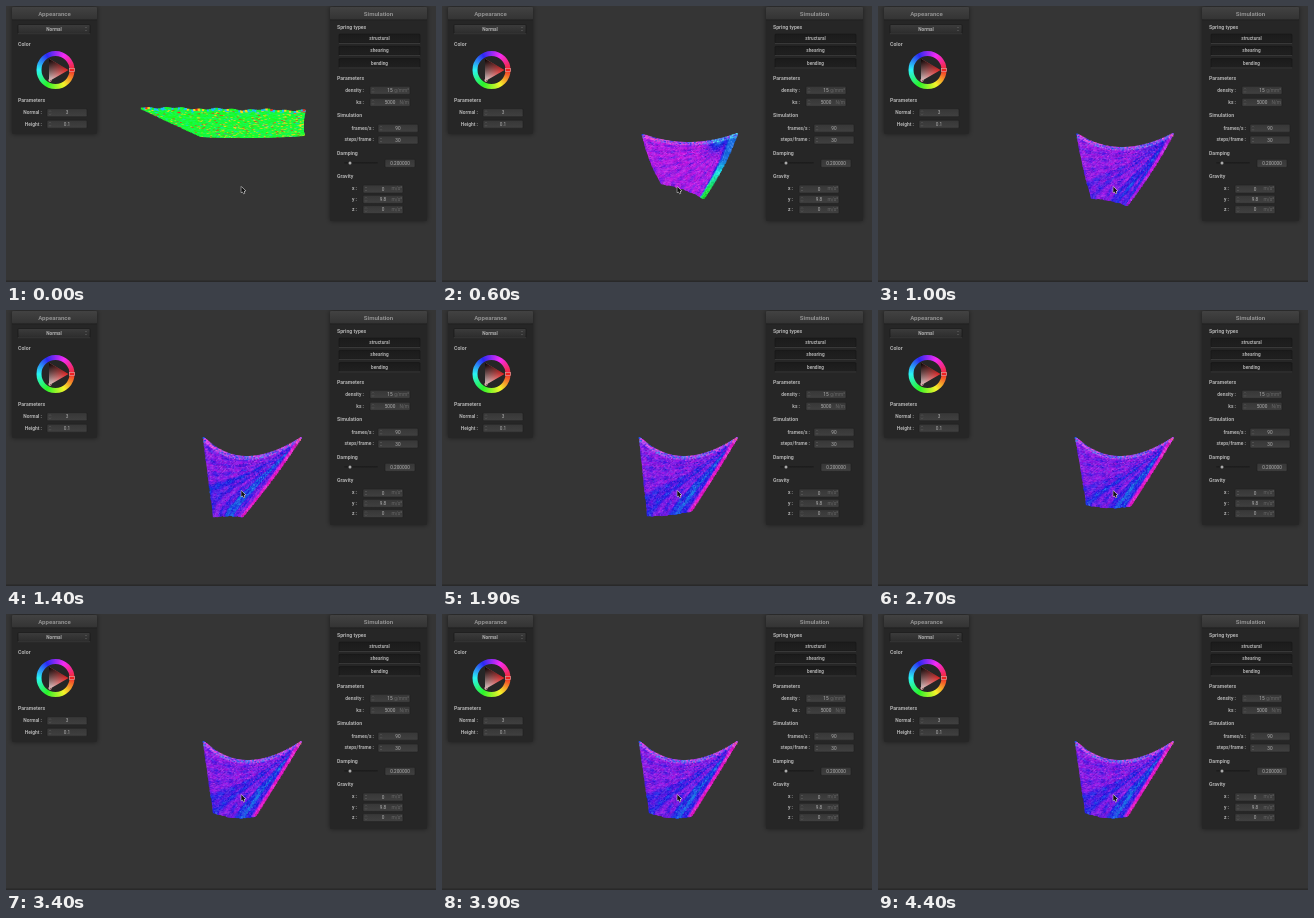
Recreate the animation shown at these times as an HTML page with a canvas. Size 430 px wide and 276 px high, loop 4500 ms.

```html
<!DOCTYPE html>
<html lang="en">
<head>
<meta charset="utf-8">
<title>Cloth simulation</title>
<style>
html, body { margin: 0; width: 100%; height: 100%; overflow: hidden; background: #353535; }
canvas { display: block; }
</style>
</head>
<body>
<canvas id="stage" width="430" height="276"></canvas>
<script>
const stage = document.getElementById('stage');
const ui = document.createElement('canvas');
ui.width = 430;
ui.height = 276;
let c = ui.getContext('2d');
const TAU = Math.PI * 2, LOOP = 4500, STEP = 100;
const lerp = (a, b, k) => a + (b - a) * k;
const clamp = x => Math.max(0, Math.min(1, x));
const bump = (x, center, width) => Math.exp(-(((x - center) / width) ** 2));
const hash = (i, j) => {
  const s = Math.sin(i * 127.1 + j * 311.7) * 43758.5453;
  return s - Math.floor(s);
};

// ---- Panels ----
function text(s, x, y, { size = 5, bold = false, align = 'left', color = '#b0b0b0' } = {}) {
  c.font = `${bold ? 'bold ' : ''}${size}px Roboto, sans-serif`;
  c.textAlign = align;
  c.textBaseline = 'middle';
  c.fillStyle = color;
  c.fillText(s, x, y);
}

function box(x, y, w, h, top, bottom, edge) {
  const g = c.createLinearGradient(0, y, 0, y + h);
  g.addColorStop(0, top);
  g.addColorStop(1, bottom);
  c.fillStyle = g;
  c.beginPath();
  c.roundRect(x, y, w, h, 1);
  c.fill();
  if (edge) {
    c.strokeStyle = edge;
    c.lineWidth = 0.6;
    c.stroke();
  }
}

function panel(x, w, h, title) {
  c.shadowColor = 'rgba(0,0,0,.5)';
  c.shadowBlur = 5;
  box(x, 1, w, h, '#262626', '#262626');
  c.shadowBlur = 0;
  box(x, 1, w, 13, '#424242', '#333');
  c.fillStyle = '#1c1c1c';
  c.fillRect(x, 13.5, w, 0.7);
  text(title, x + w / 2, 8, { size: 6.1, bold: true, align: 'center', color: '#929292' });
}

function button(s, x, y, w, pushed) {
  box(x, y, w, 9, pushed ? '#1b1b1b' : '#3c3c3c', pushed ? '#202020' : '#2c2c2c', '#151515');
  c.fillStyle = '#484848';
  c.fillRect(x, y + 9, w, 0.6);
  text(s, x + w / 2, y + 4.7, { align: 'center', bold: true, size: 4.7 });
}

function spinner(x, y) {
  c.strokeStyle = '#666';
  c.lineWidth = 0.5;
  c.beginPath();
  for (const d of [-1, 1]) {
    c.moveTo(x - 1, y + d);
    c.lineTo(x, y + d * 2);
    c.lineTo(x + 1, y + d);
  }
  c.stroke();
}

function field(label, labelX, x, y, value, unit = '', w = 40) {
  if (label) text(label + ' :', labelX, y, { align: 'right', bold: true, size: 4.9 });
  box(x, y - 4, w, 8, '#373737', '#404040', '#202020');
  if (label) spinner(x + 3, y);
  text(unit, x + w - 1, y, { align: 'right', size: 4.8, color: '#686868' });
  text(value, x + w / 2, y + 0.2, { align: 'center', size: 4.7 });
}

function colorWheel(x, y) {
  const outer = 19, inner = 14, r = 13;
  c.save();
  c.translate(x, y);
  const ring = c.createConicGradient(0, 0, 0);
  for (let i = 0; i <= 6; i++) ring.addColorStop(i / 6, `hsl(${i * 60},90%,56%)`);
  c.strokeStyle = ring;
  c.lineWidth = outer - inner;
  c.beginPath();
  c.arc(0, 0, (outer + inner) / 2, 0, TAU);
  c.stroke();
  const ax = -r / 2, ay = r * Math.sin(TAU / 3);
  const shade = (x0, y0, x1, y1, from, to) => {
    const g = c.createLinearGradient(x0, y0, x1, y1);
    g.addColorStop(0, from);
    g.addColorStop(1, to);
    c.fillStyle = g;
    c.fill();
  };
  c.beginPath();
  c.moveTo(r, 0);
  c.lineTo(ax, ay);
  c.lineTo(ax, -ay);
  c.closePath();
  shade(r, 0, ax, ay, '#f22', '#eee');
  shade((r + ax) / 2, ay / 2, ax, -ay, 'rgba(0,0,0,.1)', '#000');
  c.strokeStyle = '#d99';
  c.lineWidth = 0.7;
  c.fillStyle = '#e22';
  c.fillRect(inner, -1.5, 5, 3);
  c.strokeRect(inner, -1.5, 5, 3);
  c.beginPath();
  c.arc(ax + 1, ay - 1, 1.4, 0, TAU);
  c.stroke();
  c.restore();
}

function drawUi() {
  c.fillStyle = '#353535';
  c.fillRect(0, 0, 430, 276);
  c.fillStyle = '#292929';
  c.fillRect(0, 274.5, 430, 1.5);
  const heading = (s, x, y) => text(s, x, y, { bold: true, size: 5.2 });

  panel(6, 85, 127, 'Appearance');
  button('Normal', 12, 18.5, 72);
  spinner(80, 23);
  heading('Color', 12, 38);
  colorWheel(49.5, 64);
  heading('Parameters', 12, 94);
  field('Normal', 36, 41, 106.7, '3');
  field('Height', 36, 41, 118.2, '0.1');

  panel(324, 97, 214, 'Simulation');
  heading('Spring types', 331, 21.5);
  ['structural', 'shearing', 'bending'].forEach((s, i) => button(s, 333, 28 + i * 12.3, 81, true));
  heading('Parameters', 331, 72);
  field('density', 358, 364, 84.3, '15', 'g/mm²');
  field('ks', 358, 364, 96.3, '5000', 'N/m');
  heading('Simulation', 331, 109.7);
  field('frames/s', 368, 372, 122.2, '90');
  field('steps/frame', 368, 372, 134, '30');
  heading('Damping', 331, 147.5);
  box(338, 156.2, 34, 1.6, '#181818', '#202020');
  c.fillStyle = '#aaa';
  c.beginPath();
  c.arc(344, 157, 1.5, 0, TAU);
  c.fill();
  field('', 0, 379, 157.3, '0.200000', '', 30);
  heading('Gravity', 331, 170.8);
  ['0', '9.8', '0'].forEach((v, i) => field('xyz'[i], 351, 357, 183 + i * 10.3, v, 'm/s²'));
}

// ---- Cloth ----
// Each pose: time, then points: pin, top middle, left middle,
// free left, free middle, free right, right middle.
const poses = [
  [0,    195,130, 246,131, 165,116, 136,102, 215,104, 298,105, 296,118],
  [400,  199,129, 248,139, 192,164, 192,196, 233,207, 274,203, 290,166],
  [600,  201,129, 248,137, 209,155, 220,177, 243,183, 262,192, 281,160],
  [1400, 198,128, 241,147, 203,168, 208,206, 224,205, 237,206, 267,168],
  [1900, 198,128, 242,147, 202,167, 206,205, 228,204, 250,200, 273,164],
  [2700, 198,128, 242,147, 204,162, 209,194, 232,197, 253,195, 274,162],
  [3400, 198,128, 242,147, 203,164, 208,198, 230,203, 250,201, 273,164]
];

function poseAt(t) {
  let i = 0;
  while (i < poses.length - 2 && t > poses[i + 1][0]) i++;
  const a = poses[i], b = poses[i + 1];
  const k = clamp((t - a[0]) / (b[0] - a[0]));
  const e = k * k * (3 - 2 * k);
  const v = a.map((x, n) => lerp(x, b[n], e));
  return [1, 3, 5, 7, 9, 11, 13].map(n => [v[n], v[n + 1]]);
}

// Quadratic curve passing through m halfway.
const arc = (a, m, b, k) =>
  a * (1 - k) * (1 - 2 * k) + m * 4 * k * (1 - k) + b * k * (2 * k - 1);

// Hue follows the surface normal: green lying flat, violet hanging, blue in the folds.
function clothColor(u, v, i, j, t, freeX) {
  const n = hash(i, j), flat = clamp(1 - t / 450);
  const late = clamp((t - 600) / 600);
  const angle = Math.atan2(v, 1.02 - u);
  const shift = (freeX - 250) / 90;
  const fold = late * (bump(angle, 1.25 + shift, 0.17) + 0.5 * bump(angle, 0.75 + shift, 0.12))
    + 0.22 * Math.sin(angle * 41 + freeX * 0.2) + 0.12 * Math.sin(u * 31 - v * 6);
  let hue = lerp(286, 273, late) - clamp(fold) * 52 + (n - 0.5) * 24;
  let light = 49 + (hash(j, i) - 0.5) * 14 + ((i + j) & 1) * 4;
  const rim = clamp((u - 0.9) * 25) * (1 - late);
  hue = lerp(hue, lerp(215, 130, clamp(v * 2 - 0.8)), rim);
  hue = lerp(hue, 205, (1 - late) * bump(u, 0.82, 0.1) * bump(v, 0, 0.2));
  hue = lerp(hue, 308, late * clamp((u - 0.95) * 30));
  if (v < 0.05) {
    light += 10;
    hue += (n - 0.5) * 70;
  }
  let green = 130 + (n - 0.5) * 22;
  const speck = hash(i + 91, j + 17);
  if (speck < 0.05 + u * 0.08) green = 50;
  else if (speck > 0.97) green = 5;
  else if (speck > 0.95 || (v > 0.96 && n > 0.6)) green = 195;
  return `hsl(${lerp(hue, green, flat)},${lerp(82, 96, flat)}%,${lerp(light, 54, flat)}%)`;
}

function drawCloth(t) {
  const [pin, top, left, bl, bottom, br, right] = poseAt(t);
  const flat = clamp(1 - t / 450);
  const pin2 = [295 + flat * 2, 128 + flat];
  const cols = 72, rows = 44;
  for (let j = 0; j <= rows; j++) {
    for (let i = 0; i <= cols; i++) {
      const u = i / cols, v = j / rows;
      const [x, y] = [0, 1].map(d =>
        lerp(arc(pin[d], top[d], pin2[d], u), arc(bl[d], bottom[d], br[d], u), v)
        + lerp(arc(pin[d], left[d], bl[d], v), arc(pin2[d], right[d], br[d], v), u)
        - lerp(lerp(pin[d], pin2[d], u), lerp(bl[d], br[d], u), v));
      const wave = (Math.sin(i * 0.31) + Math.sin(i * 0.83 + 2)) * v * (0.25 + flat * 0.35);
      c.fillStyle = clothColor(u, v, i, j, t, br[0]);
      c.fillRect(x - 1 + (hash(i, j) - 0.5) * 0.6, y - 1 + wave, 2 + flat * 0.6, 2);
    }
  }
}

function drawPointer() {
  c.beginPath();
  [[0, 0], [0, 6], [1.4, 4.8], [2.4, 7], [3.4, 6.5], [2.5, 4.4], [4.2, 4.2]]
    .forEach(([x, y]) => c.lineTo(235.3 + x, 180.7 + y));
  c.closePath();
  c.strokeStyle = '#eee';
  c.lineWidth = 1;
  c.stroke();
  c.fillStyle = '#111';
  c.fill();
}

drawUi();
c = stage.getContext('2d');
const start = performance.now();
function frame() {
  const elapsed = (performance.now() - start) % LOOP;
  c.drawImage(ui, 0, 0);
  drawCloth(Math.floor(elapsed / STEP) * STEP);
  drawPointer();
  requestAnimationFrame(frame);
}
frame();
</script>
</body>
</html>
```
